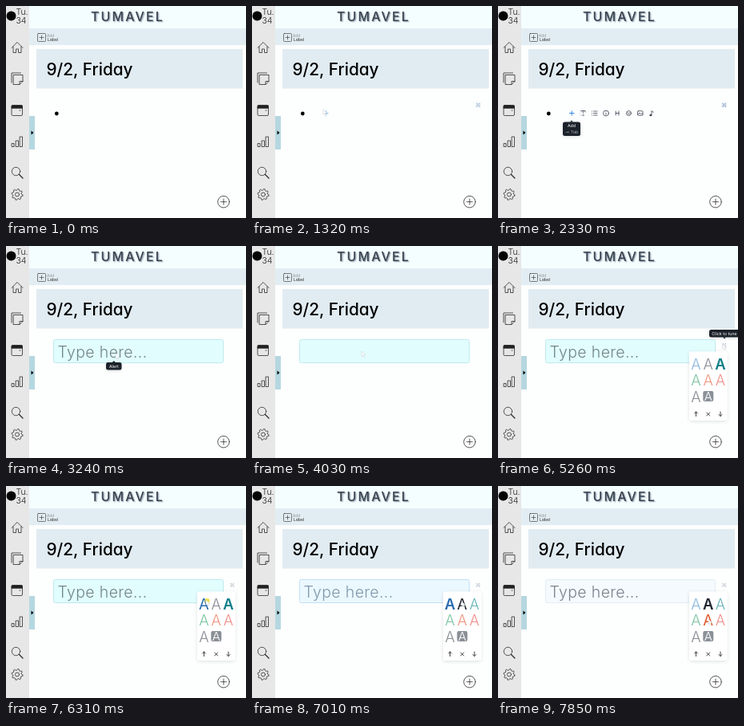
Animation of 300x266 px, one loop 8000 ms. Source, as an HTML page:

```html
<!DOCTYPE html>
<html lang="en">
<head>
<meta charset="utf-8">
<title>Journal editor</title>
<style>
  html, body { margin: 0; width: 100%; height: 100%; overflow: hidden; background: #fdfefe; }
  svg { display: block; width: 300px; height: 266px; }
  text { font-family: Inter, "Open Sans", sans-serif; font-feature-settings: "cv11"; }
  .line { fill: none; stroke: #2c2c2c; stroke-linecap: round; stroke-linejoin: round; }
  .brand { font-size: 16px; font-weight: 500; letter-spacing: 2.1px; fill: #3a4350;
           text-shadow: 1.2px 1.2px 1.5px #8b9aa8; }
  .mid { text-anchor: middle; }
  #tools .line { stroke: #3c4350; stroke-width: .8; }
</style>
</head>
<body>
<svg viewBox="0 0 300 266">
  <defs>
    <filter id="soft" x="-30%" y="-30%" width="160%" height="160%">
      <feDropShadow dx="0" dy="1" stdDeviation="2" flood-color="#0d1420" flood-opacity=".12"/>
    </filter>
  </defs>

  <!-- page -->
  <rect width="300" height="266" fill="#fdfefe"/>
  <rect x="29" width="271" height="28" fill="#f5feff"/>
  <rect x="29" y="28" width="271" height="21" fill="#e2edf3"/>
  <rect x="38" y="54" width="258" height="49.5" fill="#e1ecf2"/>
  <text x="106" y="19" class="brand">TUMAVEL</text>
  <text x="50.5" y="87" font-size="20.8" font-weight="450">9/2, Friday</text>
  <g class="line" stroke-width=".6">
    <rect x="39.5" y="34.5" width="10" height="10" rx="1"/>
    <path d="M42 39.5h5M44.5 37v5"/>
  </g>
  <text x="51" y="39.3" font-size="4.8" fill="#8a949b">Add</text>
  <text x="52" y="44.3" font-size="5" fill="#222">Label</text>

  <!-- sidebar -->
  <rect width="29" height="266" fill="#e7e7e7"/>
  <circle cx="6.5" cy="12.5" r="6" fill="#050505"/>
  <g font-size="10.5" font-weight="300" fill="#222">
    <text x="12.5" y="11">Tu.</text>
    <text x="12.5" y="22">34</text>
  </g>
  <rect x="29" y="138" width="7" height="42" fill="#b5d7e0"/>
  <path d="M31.5 156.5l3 2.5-3 2.5z"/>
  <g class="line" stroke-width=".8">
    <path d="M7 52.5l7-7 7 7M9 51v7.5h3.5v-4.5h3v4.5H19V51"/>
    <path d="M9.5 86.5H21v8l-4 4H9.5zM21 94.5h-4v4M7 96V84h11.5"/>
    <rect x="7" y="125" width="13.5" height="12.5" rx="1.500"/>
    <path d="M7 128v-2.500q0-1 1-1h11.500q1 0 1 1v2.500z" fill="#222"/>
    <path d="M17 131h1"/>
    <path d="M7.500 172.500h2.500v4H7.500zM12.500 169h3v7.500h-3zM17.500 164h3v12.500h-3z"/>
    <circle cx="12.500" cy="207.500" r="5.200"/>
    <path d="M16.500 211.500l4.500 4.500" stroke-width="1.300"/>
    <circle cx="14" cy="236.500" r="2.500"/>
    <path id="gear"/>
    <circle cx="272" cy="245.700" r="7.300"/>
    <path d="M268.500 245.700h7M272 242.200v7"/>
  </g>

  <!-- block content -->
  <circle id="bullet" cx="63.300" cy="135" r="2.400"/>
  <g id="alert">
    <rect id="panel" x="59.500" y="117.500" width="212" height="29" rx="2" stroke-width="1"/>
    <text id="hint" x="64.500" y="139.800" font-size="19.500" font-weight="300" letter-spacing=".35">Type here...</text>
  </g>
  <path id="caret" d="M64.700 119.500v25" stroke="#46666c" stroke-width=".8"/>

  <!-- block toolbar -->
  <path id="plus" d="M89.500 134.500h5.500M92.200 131.700v5.500" class="line" style="stroke:#388ae5"/>
  <g id="tools">
    <g class="line">
      <path d="M103.500 133v-1.500h5.500v1.500M106.300 131.500v6M105.200 137.500h2.200"/>
      <path d="M119.500 132h4.500M119.500 134.500h4.500M119.500 137h4.500M117.500 132h.1M117.500 134.500h.1M117.500 137h.1"/>
      <circle cx="135" cy="134.500" r="3.500"/>
      <path d="M135 134.300v2M135 132.600v.1"/>
      <path d="M147.200 132v5M151 132v5M147.200 134.500h3.800"/>
      <circle cx="163.500" cy="134.500" r="3"/>
      <path d="M162 135q1.500 1.500 3 0M162.300 133.500h.1M164.700 133.500h.1"/>
      <rect x="174.500" y="131.700" width="6.500" height="5.500" rx="1"/>
      <path d="M175 136l2-2 1.500 1.500 1-1 1.500 1.500"/>
      <path d="M192 137v-5.500q.3 1.200 2.300 1.700"/>
    </g>
    <ellipse cx="190.800" cy="137" rx="1.500" ry="1.200" fill="#3c4350"/>
  </g>
  <g id="tune">
    <rect id="tuneBack" x="279.500" y="121" width="6.500" height="6.500" rx="1" fill="#e3eefa"/>
    <path id="dots" d="M281.200 122.800h.1M284.200 122.800h.1M281.200 125.700h.1M284.200 125.700h.1M282.700 124.200h.1"
      fill="none" stroke-linecap="round" stroke-width="1.200"/>
  </g>

  <!-- colour menu -->
  <g id="menu">
    <rect x="239" y="132.500" width="47.500" height="86.500" rx="3" fill="#fff" filter="url(#soft)"/>
    <g id="swatches" class="mid" font-size="18.500"></g>
    <path class="line" stroke-width=".9" d="M247.500 213.500v-5.500M245.500 210l2-2 2 2M260.700 209l4 4M264.700 209l-4 4M278 208v5.500M276 211.500l2 2 2-2"/>
  </g>
  <circle id="glow" cx="251.500" cy="144" r="3" fill="#ecd92c"/>
  <g id="tips" class="mid" font-size="5.300" fill="#fff"></g>
  <path id="pointer" d="M0 0v6.500l1.600-1.400 1 2.300 1.100-.5-1-2.200h2.100z" fill="#fff" stroke="#b8bdc4" stroke-width=".4"/>
</svg>

<script>
const $ = id => document.getElementById(id);
const LOOP = 8000;
const clamp = v => Math.max(0, Math.min(1, v));
const ease = v => v * v * (3 - 2 * v);

const tooth = Array.from({ length: 33 }, (_, i) => {
  const r = i % 4 < 2 ? 7 : 5.4, a = (i + .5) * Math.PI / 16;
  return `${14 + r * Math.cos(a)} ${236.5 + r * Math.sin(a)}`;
});
$("gear").setAttribute("d", "M" + tooth.join("L"));

// Menu letters, three to a row
const inks = ["#2b6cb0", "#222731", "#0f7f88", "#2f855a", "#dd5a2b", "#c53030", "#4a5056"];
const faded = ["#8bb9df", "#8b9097", "#6bb5b8", "#7fc5a4", "#ee9a83", "#f0938d", "#8b9097"];
$("swatches").innerHTML = inks.map((_, i) =>
  `<text x="${247.5 + i % 3 * 15.2}" y="${154.5 + (i / 3 | 0) * 20.5}">A</text>`).join("") +
  `<rect x="256.300" y="182" width="13" height="13" rx="2" fill="#8b9097"/>
   <text x="262.800" y="194" font-size="15" font-weight="300" fill="#fff">A</text>`;
const letters = [...$("swatches").children].slice(0, inks.length);

// Tooltips: label, centre x, top, width, start, end, hint line
const tips = [
  ["Add", 92, 145.5, 22, 1500, 2380, "⇥ Tab"],
  ["Alert", 134.8, 146, 19.5, 2500, 3640],
  ["Audio", 192, 145, 22, 4360, 4710],
  ["Click to tune", 283, 105, 38, 4900, 5560]
].map(([label, x, y, w, from, to, extra]) => {
  const h = extra ? 17.5 : 9.5, below = y < 120;
  const arrow = below ? `M${x - 2} ${y + h}h4l-2 2z` : `M${x - 2} ${y}h4l-2-2z`;
  $("tips").insertAdjacentHTML("beforeend", `<g>
    <rect x="${x - w / 2}" y="${y}" width="${w}" height="${h}" rx="2.500" fill="#1d202b" filter="url(#soft)"/>
    <path d="${arrow}" fill="#1d202b"/>
    <text x="${x}" y="${y + 6.8}">${label}</text>
    ${extra ? `<text x="${x}" y="${y + 14}" fill="#a4a8b5">${extra}</text>` : ""}</g>`);
  return { el: $("tips").lastElementChild, from, to };
});

// Pointer stops: time, x, y
const stops = [
  [360, 290, 272], [800, 180, 112], [1160, 95, 128], [1250, 95, 128],
  [1450, 74, 134], [1630, 84, 134], [1770, 84, 134], [2070, 101, 131],
  [2280, 101, 131], [2650, 137, 135], [3470, 137, 135], [3790, 137, 132],
  [4030, 137, 132], [4730, 270, 122], [4830, 281, 123], [5520, 281, 123],
  [5910, 250, 143], [6450, 250, 143], [7110, 263, 145], [7590, 263, 145],
  [7850, 263, 167], [LOOP, 263, 167]
];

function pointerAt(t) {
  const i = stops.findIndex(s => s[0] > t);
  if (i < 1) return stops[0].slice(1);
  const [a, b] = [stops[i - 1], stops[i]];
  const k = ease((t - a[0]) / (b[0] - a[0]));
  return [1, 2].map(n => a[n] + (b[n] - a[n]) * k);
}

// Fades in from `from` and out from `to`
const span = (t, from, to, fade) => clamp((t - from) / fade) * clamp(1 - (t - to) / fade);
const rise = (t, from, fade) => clamp((t - from) / fade);
const show = (id, v) => $(id).setAttribute("opacity", v);

// Alert fill, border and hint colours
const themes = [
  ["#ebf8ff", "#c3e0f4", "#7f98ac"],
  ["#f4fafd", "#e2edf4", "#78828c"],
  ["#e2fdfe", "#bdeaec", "#708489"]
];

function draw(t) {
  const plain = t < 3210;
  const typing = t >= 3280 && t < 5000;
  const active = t < 6350 ? 2 : t < 7320 ? 0 : 1;
  const hover = t < 5800 ? -1 : t < 6750 ? 0 : t < 7720 ? 1 : 4;
  const [fill, edge, ink] = themes[active];

  $("panel").setAttribute("fill", fill);
  $("panel").setAttribute("stroke", edge);
  $("hint").setAttribute("fill", ink);
  show("hint", +!typing);
  show("bullet", +plain);
  show("alert", +!plain);
  show("caret", +(typing && (t - 3280) % 1000 < 500));

  show("plus", plain * rise(t, 1260, 80));
  show("tools", plain * rise(t, 1790, 220));
  show("tune", rise(t, plain ? 1260 : 4250, 80));
  show("tuneBack", plain ? 1 : .25);
  $("dots").setAttribute("stroke", plain ? "#5c7898" : "#9a9fa5");
  show("menu", rise(t, 5020, 100));
  show("glow", span(t, 5850, 6500, 60) * .85);

  letters.forEach((el, i) => {
    const on = i === active;
    el.setAttribute("fill", on || i === hover ? inks[i] : faded[i]);
    el.setAttribute("font-weight", on ? 600 : i === hover ? 400 : 300);
  });

  tips.forEach(({ el, from, to }) => el.setAttribute("opacity", span(t, from, to, 120)));
  $("pointer").setAttribute("transform", `translate(${pointerAt(t)})`);
}

const start = performance.now();
function tick() {
  draw((performance.now() - start) % LOOP);
  requestAnimationFrame(tick);
}
tick();
</script>
</body>
</html>
```
